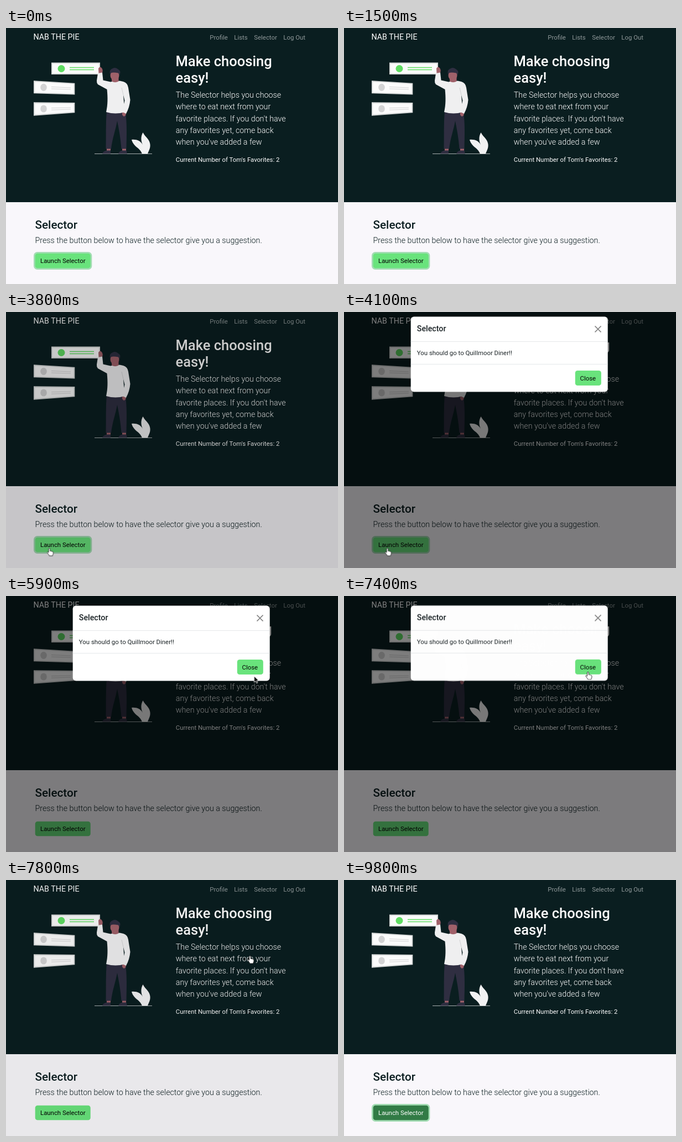
An HTML page that plays this animation: 600 px wide and 463 px high, repeating every 9900 ms.

```html
<!DOCTYPE html>
<html lang="en">
<head>
<meta charset="utf-8">
<title>Selector</title>
<style>
  html, body { margin: 0; height: 100%; overflow: hidden; background: #f9f7fb; }
  svg { display: block; width: 100vw; height: 100vh; font: 400 11.4px Roboto, sans-serif; }
  .lead { font-size: 14.26px; font-weight: 300; }
  .brand { font-size: 14.26px; }
  .title { font-size: 14.26px; font-weight: 500; }
  .h1 { font-size: 25.5px; font-weight: 500; }
  .h2 { font-size: 20.7px; font-weight: 500; }
  .card { fill: #fbfbfb; stroke: #d9dbdb; stroke-width: 2; }
  .skin { fill: #a0616a; }
  .navy { fill: #2f2e41; }
  .shirt { fill: #efeff0; }
</style>
</head>
<body>
<svg viewBox="0 0 600 463" preserveAspectRatio="none">
  <rect width="600" height="463" fill="#f9f7fb"/>
  <rect width="600" height="315" fill="#0a1e20"/>

  <g fill="#fff">
    <text class="brand" x="49.5" y="21.2">NAB THE PIE</text>
    <g fill-opacity=".55">
      <text x="368.3" y="21">Profile</text>
      <text x="412.3" y="21">Lists</text>
      <text x="448.3" y="21">Selector</text>
      <text x="501.3" y="21">Log Out</text>
    </g>
    <g class="h1">
      <text x="306.5" y="68.700">Make choosing</text>
      <text x="306.5" y="98.700">easy!</text>
    </g>
    <g class="lead">
      <text x="306.8" y="125.8">The Selector helps you choose</text>
      <text x="306.8" y="147.2">where to eat next from your</text>
      <text x="306.8" y="168.6">favorite places. If you don't have</text>
      <text x="306.8" y="190">any favorites yet, come back</text>
      <text x="306.8" y="211.4">when you've added a few</text>
    </g>
    <text x="306.8" y="242">Current Number of Tom's Favorites: 2</text>
  </g>

  <g id="art">
    <path class="card" d="M83 63.5H169V83H83Z"/>
    <circle cx="100" cy="73.5" r="6.5" fill="#5fdc62"/>
    <path d="M115 71.5H159M115 75.5H159" stroke="#5fdc62" stroke-width="1.6"/>
    <path class="card" d="M51 96.3 123.3 100.6V119.4L51 117.4Z"/>
    <path class="card" d="M51 135.2 123.3 136V152.4L51 157.6Z"/>
    <g fill="#d3d3d4">
      <ellipse cx="68" cy="107.3" rx="5.8" ry="6.6"/>
      <ellipse cx="68" cy="146" rx="5.8" ry="6.6"/>
    </g>
    <path d="M82 106.5 117 108M82 110 117 111M82 144.8 117 144M82 148.2 117 147" stroke="#d3d3d4" fill="none"/>

    <path d="M160 227.5H264" stroke="#a9afb0"/>
    <path d="M227 202C236 201 243 204 247 211C243 203 244 195 247.500 189C251 197 260 201 260.500 211C261 218 258 222 256 227.500H246C242 216 231 216 227 202Z" fill="#f1f1f2"/>

    <path class="skin" d="M182 214H189V223H182ZM210 214H217V223H210Z"/>
    <path class="navy" d="M174 227.500Q175 223 182 221.500H189V227.500ZM203 227.500Q204 223 210 221.500H217.500L219 227.500Z"/>
    <path class="navy" d="M182 149H215.500C219 172 218 195 217.500 218.500H208.500C207 198 204 183 201 168C198 185 192 200 190 218.500H180.500C181 195 180 172 182 149Z"/>
    <path class="skin" d="M167 73Q170 68 173.500 73Q176 78 173 83H167.500Z"/>
    <path class="skin" d="M210 153Q214 150 217 154Q217 159 213 160Q209 158 210 153Z"/>
    <path class="shirt" d="M166 82 174 80.500 175.500 94.500 189 97.500Q200 94 212 97Q219.500 99 221 108L224.500 130Q223.500 143 217 155L210.500 152 214.500 131 212 121 214.500 152Q198 157 181 152C184 139 184 126 182.500 111L166 102Q163.500 99 164 95Z"/>
    <path d="M212 121 209 108" stroke="#d0d1d3" fill="none"/>
    <path class="skin" d="M191 90H203.500V96.500Q197 100 191 96.500Z"/>
    <ellipse class="skin" cx="196.500" cy="86" rx="8" ry="8.800"/>
    <path class="navy" d="M188 84Q186 75 193 73Q198 70 203 75Q208 77 205.500 85L203 81.500Q195 80 190 81Z"/>
  </g>

  <g fill="#0b1e20">
    <text class="h2" x="52.5" y="363">Selector</text>
    <text class="lead" x="52.5" y="389">Press the button below to have the selector give you a suggestion.</text>
  </g>
  <rect id="ring" x="50" y="405" width="105.300" height="32" rx="6.500" fill="#a3dcb3"/>
  <rect id="launch" x="52.700" y="407.700" width="100" height="26.600" rx="4.300" fill="#69e37c"/>
  <text id="label" x="62" y="425" fill="#000">Launch Selector</text>

  <rect id="shade" width="600" height="463" opacity="0"/>

  <g id="modal" opacity="0">
    <rect x="120.700" y="17.500" width="356" height="136" rx="5.700" fill="#fff"/>
    <path d="M120.700 62.500H476.700M120.700 103.500H476.700" stroke="#dfe2e5" stroke-width=".8"/>
    <g fill="#1b2326">
      <text class="title" x="131.800" y="44">Selector</text>
      <text x="131.800" y="87">You should go to Quillmoor Diner!!</text>
    </g>
    <path d="M453.500 34.500 464.500 45.500M464.500 34.500 453.500 45.500" stroke="#7f7f7f" stroke-width="1.700"/>
    <rect x="417.800" y="115" width="47" height="27" rx="4.300" fill="#69e37c"/>
    <text x="426.500" y="132.500">Close</text>
  </g>

  <g id="cursor" opacity="0">
    <path id="hand" d="M-1.400 1Q-1.400 -.2 -.1 -.2Q1.200 -.2 1.200 1V5Q2.600 4.200 3.400 5.300Q4.800 4.800 5.300 6Q6.900 5.700 6.900 7.400V9.800Q6.600 11.300 5.800 12.200V13.500H-.3Q-.8 11.600 -2.200 10.200L-4.200 7.400Q-4.200 5.800 -2.700 6.400L-1.400 7.500Z" fill="#fff" stroke="#222" stroke-width=".9" stroke-linejoin="round"/>
    <path id="arrow" d="M0 0V11.200L2.600 8.800 4.400 12.800 6.300 12 4.600 8.100H8Z" fill="#000" stroke="#fff" stroke-width=".9" opacity="0"/>
  </g>
</svg>
<script>
  const LOOP = 9900;

  // steps: [ms, value, easing until the next step]
  function play(id, prop, steps) {
    const all = [[0, steps[0][1]], ...steps, [LOOP, steps[steps.length - 1][1]]];
    const frames = all.map(([ms, value, easing = "linear"]) =>
      ({ offset: ms / LOOP, [prop]: value, easing }));
    document.getElementById(id).animate(frames, { duration: LOOP, iterations: Infinity });
  }
  const at = (x, y) => `translate(${x}px, ${y}px)`;
  const fade = (start, from, to, ms = 150) => [[start, from], [start + ms, to]];

  play("shade", "opacity", [...fade(3740, 0, 0.5), ...fade(7670, 0.5, 0)]);

  play("modal", "opacity", [...fade(3910, 0, 1), ...fade(7400, 1, 0)]);
  play("modal", "transform", [
    [3910, at(0, -50), "ease-out"], [4210, at(0, 0)],
    [7400, at(0, 0), "ease-out"], [7700, at(0, -50)]
  ]);

  play("ring", "opacity", [...fade(4210, 1, 0), ...fade(7840, 0, 1)]);
  play("launch", "fill", fade(7840, "#69e37c", "#327b46"));
  play("label", "fill", fade(7840, "#000", "#fff"));

  play("cursor", "opacity", [...fade(2100, 0, 1, 0), ...fade(9150, 1, 0, 0)]);
  play("cursor", "transform", [
    [2100, at(71, 421), "ease-out"], [2400, at(78.5, 427.5)],
    [4850, at(78.5, 427.5), "ease-in"], [5250, at(270, 275)],
    [5600, at(472, 157), "ease-out"], [5800, at(448.5, 145)],
    [5950, at(448.5, 145), "ease-out"], [6300, at(441, 137.5)],
    [8250, at(441, 137.5), "ease-in"], [9150, at(606, 468)]
  ]);
  const swaps = [[4900, 1], [6100, 0], [8300, 1]];
  play("arrow", "opacity", swaps.flatMap(([ms, on]) => fade(ms, 1 - on, on, 0)));
  play("hand", "opacity", swaps.flatMap(([ms, on]) => fade(ms, on, 1 - on, 0)));
</script>
</body>
</html>
```
